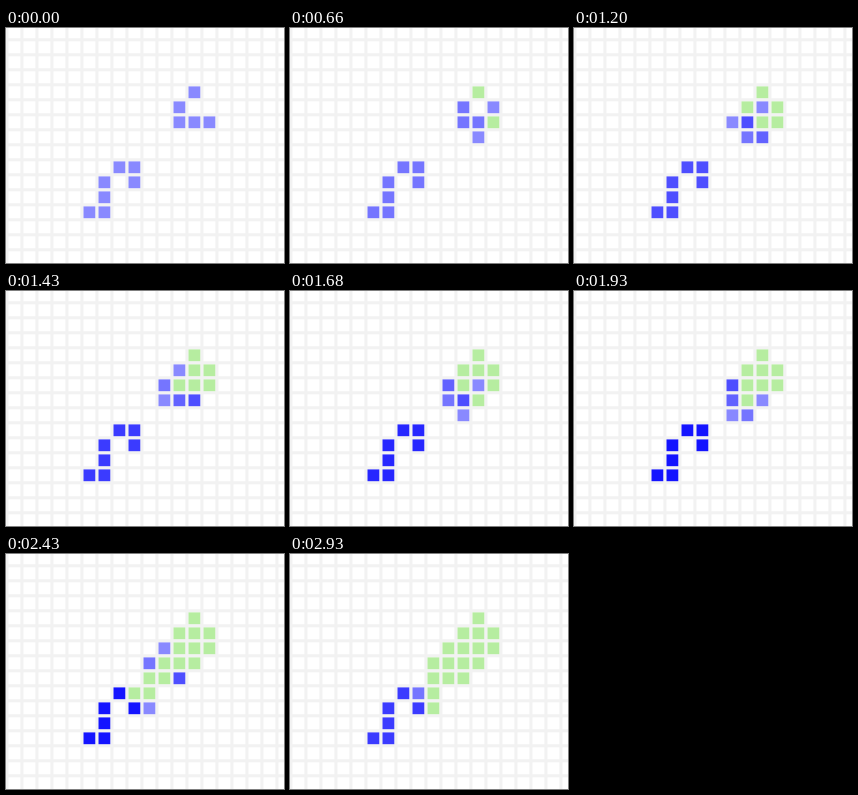
A matplotlib script for the animation above (3010 ms loop, 278 px wide and 235 px high).

```python
import numpy as np
import matplotlib.pyplot as plt
from matplotlib.animation import FuncAnimation
from matplotlib.collections import PatchCollection
from matplotlib.patches import Rectangle

WIDTH, HEIGHT, DPI = 278, 235, 100
PITCH, SIDE = 15, 11.8
LEFT, TOP = 2.5, -1.6
COLS, ROWS = 19, 16
TICK, LOOP = 10, 3010
STEP_TIMES = [660, 970, 1200, 1430, 1680, 1930, 2180, 2430, 2680, 2930]

GLIDER = [(12, 4), (11, 5), (11, 6), (12, 6), (13, 6)]
EATER = [(7, 9), (8, 9), (6, 10), (8, 10), (6, 11), (5, 12), (6, 12)]
CLEAR = (1, 1, 1, 0)
TRAIL = (0.714, 0.929, 0.627, 1)


def life_step(alive):
    padded = np.pad(alive.astype(int), 1)
    total = sum(padded[1 + dy:1 + dy + ROWS, 1 + dx:1 + dx + COLS]
                for dy in (-1, 0, 1) for dx in (-1, 0, 1))
    return (total == 3) | (alive & (total == 4))


def cell_color(age, visited):
    """Blue deepens until age 7, then lightens again; dead cells leave a trail."""
    if age >= 0:
        tint = abs(age - 7) * 19.5 / 255
        return (tint, tint, 1, 1)
    return TRAIL if visited else CLEAR


def generations(count):
    alive = np.zeros((ROWS, COLS), bool)
    for col, row in GLIDER + EATER:
        alive[row, col] = True
    age = np.where(alive, 0, -1)
    visited = alive.copy()
    for _ in range(count):
        yield [cell_color(a, v) for a, v in zip(age.flat, visited.flat)]
        alive = life_step(alive)
        age = np.where(alive, age + 1, -1)
        visited |= alive


palettes = list(generations(len(STEP_TIMES) + 1))

fig = plt.figure(figsize=(WIDTH / DPI, HEIGHT / DPI), dpi=DPI, facecolor="white")
ax = fig.add_axes([0, 0, 1, 1])
ax.set(xlim=(0, WIDTH), ylim=(HEIGHT, 0))
ax.axis("off")

gap = PITCH - SIDE
line = dict(color="#f2f2f2", linewidth=3 * 72 / DPI, snap=False, zorder=1)
for k in range(COLS + 1):
    ax.axvline(LEFT - gap / 2 + k * PITCH, **line)
for k in range(ROWS + 1):
    ax.axhline(TOP - gap / 2 + k * PITCH, **line)

squares = [Rectangle((LEFT + col * PITCH, TOP + row * PITCH), SIDE, SIDE)
           for row in range(ROWS) for col in range(COLS)]
cells = PatchCollection(squares, linewidth=0, edgecolor="none", snap=False, zorder=2)
ax.add_collection(cells, autolim=False)


def update(frame):
    generation = sum(frame * TICK >= t for t in STEP_TIMES)
    cells.set_facecolor(palettes[generation])
    return (cells,)


anim = FuncAnimation(fig, update, frames=LOOP // TICK, interval=TICK,
                     repeat=True, repeat_delay=0)
plt.show()
```
